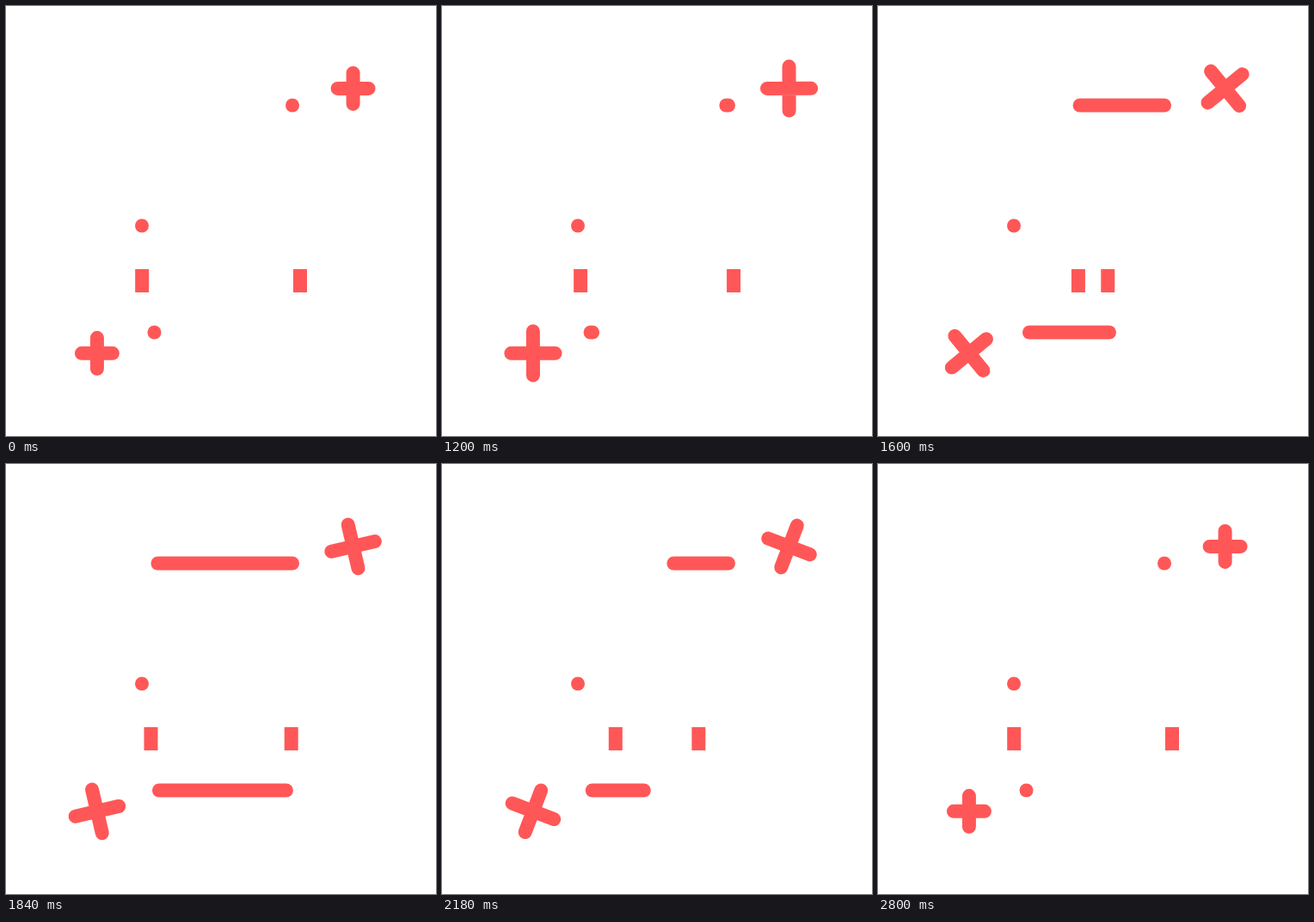
An HTML page for the animation above (3000 ms loop, 500 by 500 pixels).

```html
<!DOCTYPE html>
<html lang="en">
<head>
<meta charset="utf-8">
<title>Turning lines</title>
<style>
  html, body { margin: 0; width: 100%; height: 100%; overflow: hidden; background: #fff; }
  svg { display: block; width: 100vw; height: 100vh; }
  path { fill: none; stroke: #ff5757; stroke-width: 16; stroke-linecap: round; }
  .bar { stroke-linecap: butt; }
</style>
</head>
<body>
<svg viewBox="0 0 500 500">
  <path id="blink"/>
  <path id="top"/>
  <path id="bottom"/>
  <path id="left" class="bar"/>
  <path id="right" class="bar"/>
  <path id="plusA"/>
  <path id="plusB"/>
</svg>
<script>
const LOOP = 3000;

// Eased progress from 0 to 1 between two times.
function ease(t, start, end) {
  const u = Math.min(1, Math.max(0, (t - start) / (end - start)));
  return u * u * (3 - 2 * u);
}

const during = (t, start, end) => t >= start && t < end;
const draw = (id, d) => document.getElementById(id).setAttribute('d', d);
const dash = (x0, x1, y) => `M${x0} ${y}H${x1 + 0.01}`;
const bar = x => `M${x} 306V333`;

function plus(x, y, arm, angle) {
  const c = arm * Math.cos(angle), s = arm * Math.sin(angle);
  return `M${x - c} ${y - s}L${x + c} ${y + s}M${x + s} ${y - c}L${x - s} ${y + c}`;
}

function render(t) {
  const blinking = during(t, 300, 500) || during(t, 700, 860);
  draw('blink', dash(blinking ? 119 : 158, 158, 255.5));

  // The pluses grow, make two turns to the left and shrink again.
  const arm = 18 + 8 * (ease(t, 1020, 1230) - ease(t, 2630, 2800));
  const angle = -4 * Math.PI * ease(t, 1190, 2710);
  draw('plusA', plus(403.6, 95.9, arm, angle));
  draw('plusB', plus(105.9, 403.8, arm, angle));

  // The bars swap sides and return; the lines extend with them but retract sooner.
  const out = ease(t, 1140, 1960);
  const swing = 184 * (out - ease(t, 1905, 2775));
  draw('left', bar(158.2 + swing));
  draw('right', bar(342 - swing));

  const length = 166 * Math.max(0, out - ease(t, 1905, 2382));
  draw('top', dash(333 - length, 333, 115.5));
  draw('bottom', dash(172.5 + 0.035 * length, 172.5 + 0.98 * length, 379.5));
}

function frame() {
  render(performance.now() % LOOP);
  requestAnimationFrame(frame);
}
frame();
</script>
</body>
</html>
```
